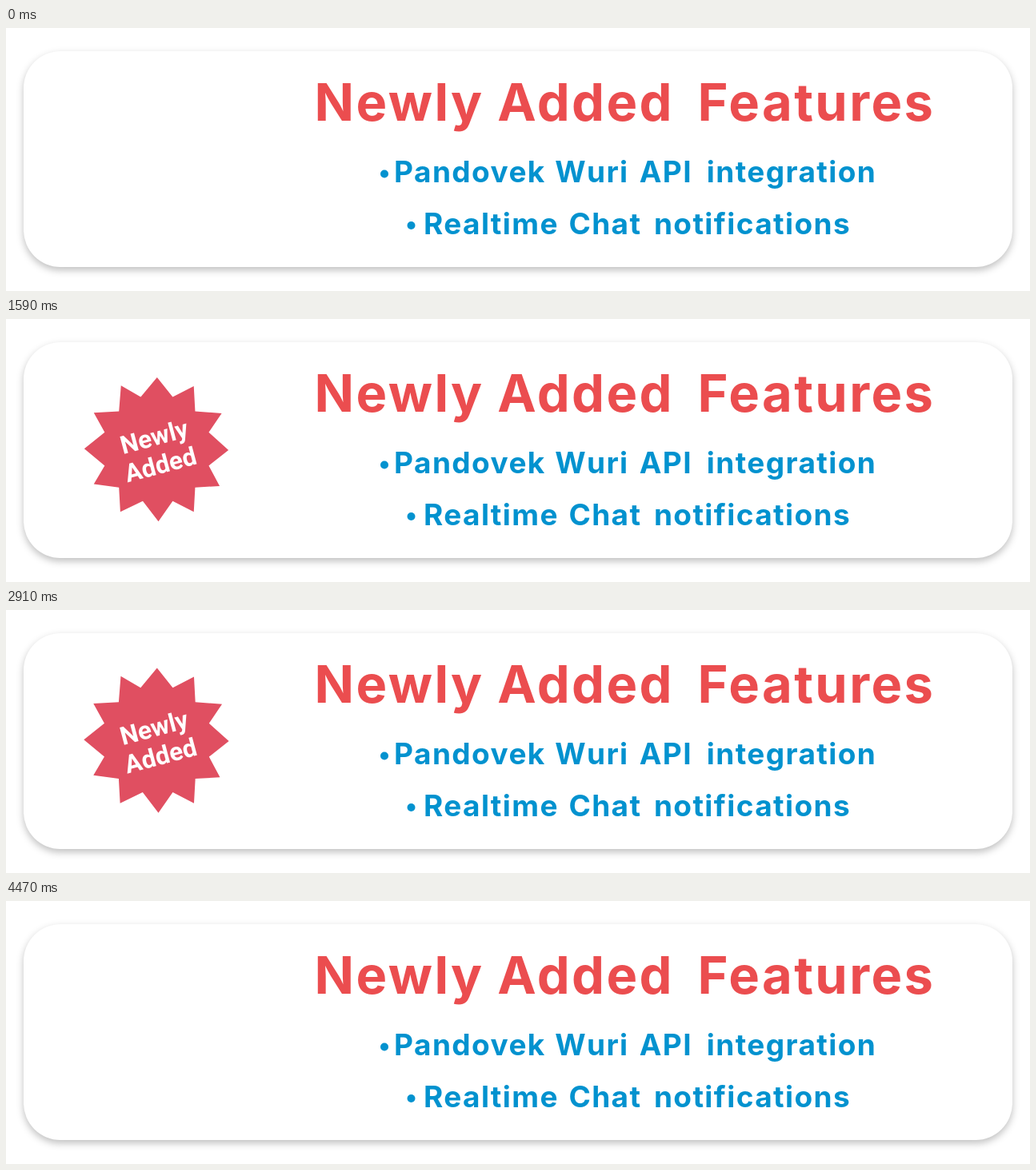
Animation of 1280x329 px, one loop 4500 ms. Source, as an HTML page without scripts:

```html
<!DOCTYPE html>
<html lang="en">
<head>
<title>Newly Added Features</title>
<style>
  html, body { margin: 0; width: 100%; height: 100%; overflow: hidden; background: #fff; }
  .card {
    position: absolute; left: 22px; top: 29px; width: 1236px; height: 270px;
    border-radius: 46px; background: #fff;
    box-shadow: 0 4px 10px rgba(0, 0, 0, .25);
  }
  svg { position: absolute; left: 0; top: 0; width: 1280px; height: 329px; }
  text { text-anchor: middle; font-weight: 700; }
  .title { font-family: Inter, sans-serif; font-size: 65px; letter-spacing: 2.4px; fill: #eb4d4f; }
  .list { fill: #0292cf; }
  .list text { font-family: Inter, sans-serif; font-size: 37px; letter-spacing: 1.4px; }
  .label text { font-family: Roboto, sans-serif; font-size: 37px; fill: #fff; }

  .badge {
    transform-box: view-box;
    transform-origin: 193.5px 163.5px;
    animation: size 4.5s ease-in-out infinite, tumble 4.5s ease-in-out infinite;
  }
  /* pop in, rest, pulse twice, pop out */
  @keyframes size {
    0% { scale: 0; }
    8.444% { scale: 1.06; }
    16%, 26% { scale: 1; }
    33.222% { scale: .84; }
    47.667% { scale: 1.0745; }
    54.889% { scale: 1; }
    62.111% { scale: .84; }
    76.556% { scale: 1.0745; }
    83.778% { scale: 1; }
    89.556% { scale: 1.06; }
    99.333%, 100% { scale: 0; }
  }
  @keyframes tumble {
    0% { rotate: -45deg; }
    16%, 83.333% { rotate: 0deg; }
    99.333%, 100% { rotate: -45deg; }
  }
</style>
</head>
<body>
<div class="card"></div>
<svg viewBox="0 0 1280 329">
  <text class="title" y="116">
    <tspan x="500.5">Newly</tspan> <tspan x="733.5">Added</tspan> <tspan x="1013">Features</tspan>
  </text>

  <g class="list">
    <circle cx="473" cy="182.5" r="5"/>
    <text y="193">
      <tspan x="585">Pandovek</tspan> <tspan x="737.5">Wuri</tspan> <tspan x="830">API</tspan> <tspan x="982">integration</tspan>
    </text>
    <circle cx="506.5" cy="247" r="5"/>
    <text y="258">
      <tspan x="611.5">Realtime</tspan> <tspan x="754">Chat</tspan> <tspan x="933">notifications</tspan>
    </text>
  </g>

  <g class="badge">
    <polygon fill="#e04f61" points="
      188,57 211,86 242,70 244,107 283,110 264,138
      293,164 264,187 280,217 244,219 242,255 211,239
      190,269 167,239 134,255 132,219 95,214 111,187
      81,162 111,138 95,109 132,107 135,69 164,86"/>
    <g class="label" transform="translate(187 157) rotate(-15)">
      <text>Newly</text>
      <text x="-1.5" y="42">Added</text>
    </g>
  </g>
</svg>
</body>
</html>
```
